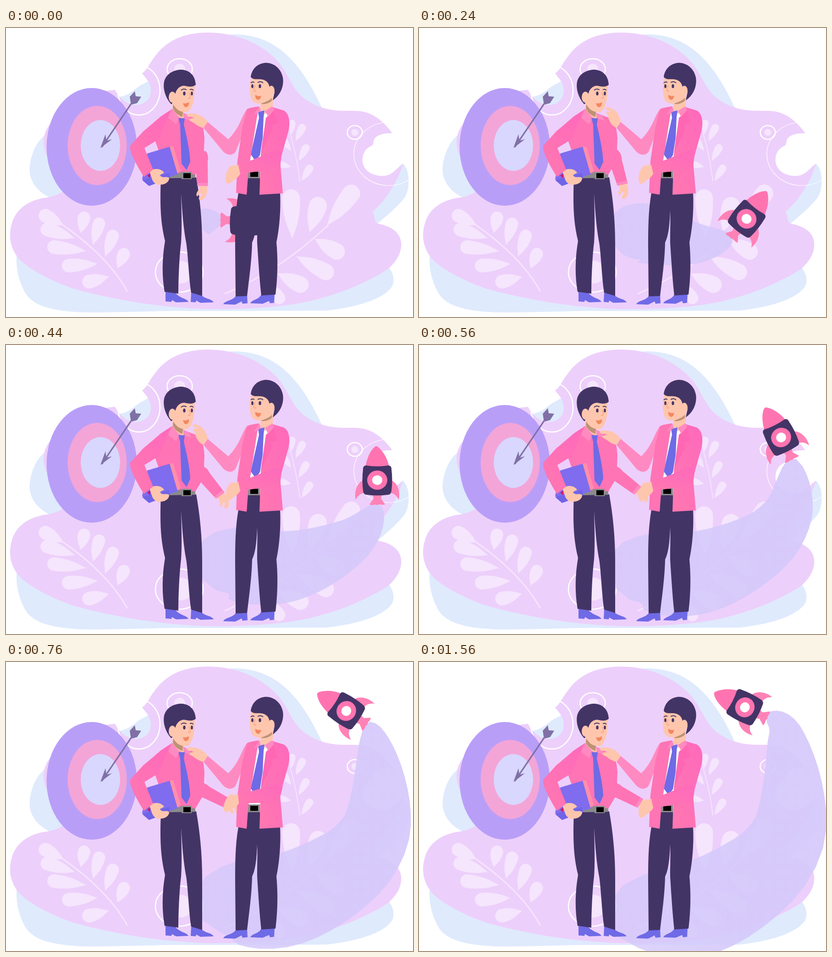
These frames come from a looping animation (888 by 631 pixels, 1600 ms). An HTML page:

```html
<!DOCTYPE html>
<html lang="en">
<head>
<meta charset="utf-8">
<title>Handshake</title>
<style>
html, body { margin: 0; width: 100%; height: 100%; overflow: hidden; background: #fff; }
svg { display: block; width: 100vw; height: 100vh; }
.lilac { fill: #edcffb; }
.pale { fill: #f5e5fd; }
.ring { fill: none; stroke: #fff; stroke-width: 2.6; }
.dark { fill: #433466; }
.pink { fill: #ff74b4; }
.light { fill: #ff8ac1; }
.deep { fill: #ff66b4; }
.skin { fill: #ffc6ae; }
.shade { fill: #bd9273; }
.blue { fill: #6f6ae6; }
.stem { fill: none; stroke: #f5e5fd; stroke-width: 3; stroke-linecap: round; }
.grey { fill: #8b8b8b; }
</style>
</head>
<body>
<svg viewBox="0 0 888 631" preserveAspectRatio="none">
  <defs>
    <linearGradient id="cloth" x1="0" y1="1" x2="1" y2="0">
      <stop offset="0" stop-color="#ff78b0"/><stop offset="1" stop-color="#ff69bc"/>
    </linearGradient>
    <linearGradient id="haze" gradientUnits="userSpaceOnUse" x1="430" y1="0" x2="760" y2="0">
      <stop offset="0" stop-color="#d2c8fa" stop-opacity=".75"/><stop offset="1" stop-color="#d6cafb" stop-opacity=".95"/>
    </linearGradient>
    <g id="face">
      <ellipse class="dark" cx="389" cy="143" rx="2.7" ry="4.3"/>
      <ellipse class="dark" cx="405.500" cy="143" rx="2.3" ry="4.3"/>
      <path fill="none" stroke="#433466" stroke-width="1.8" d="M382 136Q387 131 394 135M401 135Q405 132 409 136"/>
      <path fill="none" stroke="#f39a78" stroke-width="1.3" d="M399 141Q404 151 401 154L397 153"/>
      <path fill="#f4875f" d="M386 164Q393 166 399 162C400 169 396 173 392 173Q388 172 386 164Z"/>
    </g>
  </defs>

  <path fill="#dfeafd" d="M490 14C565 12 630 45 688 172L700 300L760 350L845 323L866 296C882 310 882 350 870 370C850 395 830 410 805 432L820 510C845 525 850 550 842 565C820 595 760 610 700 617L400 618C330 617 250 622 170 621C90 618 55 603 40 575C25 545 22 520 23 498L100 470L95 370C65 355 48 330 52 300C56 270 68 245 90 230L150 180L250 150C275 145 285 127 300 122Z"/>
  <path class="lilac" d="M297 99C308 92 312 78 325 62C345 35 375 12 435 10C500 8 560 35 595 75C620 105 625 140 660 160C700 185 735 180 765 181C800 182 825 205 843 230C825 229 812 233 805 240C800 248 803 253 798 257C785 262 776 275 778 292C781 312 798 322 820 323C842 324 850 308 866 296C857 330 838 358 825 375C815 388 805 395 800 402C808 415 800 425 815 428C850 435 865 455 862 478C860 500 845 515 835 525C790 555 730 580 660 597C600 610 520 615 440 614C330 610 230 592 150 570C90 550 40 520 25 500C10 480 5 455 12 430C20 395 50 375 90 370C120 365 130 352 150 340C110 320 80 280 82 245C85 220 95 210 110 195C150 150 200 138 238 135C245 150 262 168 285 168C305 167 317 152 316 135C315 118 305 110 297 99Z"/>

  <ellipse class="ring" cx="290" cy="136" rx="46" ry="54"/>
  <ellipse class="ring" cx="379" cy="90" rx="27.500" ry="23"/>
  <circle class="pale" cx="379" cy="90" r="12"/>
  <ellipse class="ring" cx="378" cy="533" rx="52" ry="44"/>
  <ellipse class="pale" cx="380" cy="533" rx="27" ry="25"/>
  <ellipse class="ring" cx="761" cy="228" rx="16.500" ry="15"/>
  <circle class="pale" cx="761" cy="228" r="7.5"/>
  <ellipse class="ring" cx="835" cy="275" rx="76" ry="69" style="stroke-width:1.2"/>

  <path class="stem" d="M264 574C240 530 195 480 124 430"/>
  <path class="stem" d="M478 580C570 540 640 490 702 431"/>
  <path class="stem" d="M641 334C637 300 630 265 620 230" style="stroke-width:2"/>
  <g id="leaves" class="pale"></g>

  <ellipse fill="#b99ef8" cx="187" cy="259.500" rx="98.500" ry="128.500"/>
  <ellipse fill="#f3a5d8" cx="199" cy="256.500" rx="64.500" ry="86.500"/>
  <ellipse fill="#d9d7fd" cx="206" cy="256.500" rx="43" ry="55.500"/>
  <g fill="#8070a6">
    <path d="M209 260L274 164" stroke="#8070a6" stroke-width="3.2"/>
    <path d="M206 262L217 232L219 246L231 243Z"/>
    <path d="M272 163L270 150L281 138L283 149L295 150L286 164L275 167Z"/>
  </g>

  <path id="smoke" fill="url(#haze)"/>
  <g id="rocket">
    <g fill="#ff82b6">
      <path d="M-30 0C-44 6 -51 24 -47 43C-42 33 -36 29 -28 28Z"/>
      <path d="M30 0C44 6 51 24 47 43C42 33 36 29 28 28Z"/>
      <path d="M-10 31L10 31L8 40L17 53C9 56 5 51 0 55C-5 51 -9 57 -17 53L-8 40Z"/>
    </g>
    <path fill="#ff74b0" d="M-26 -29C-22 -48 -16 -64 -5 -73Q-2 -75 1 -73C13 -63 22 -48 26 -29Z"/>
    <path class="dark" d="M-24 -32Q0 -28 24 -32Q31 -32 31 -24Q34 0 31 23Q30 32 23 32Q0 35 -23 32Q-30 32 -31 23Q-34 0 -31 -24Q-31 -32 -24 -32Z"/>
    <ellipse fill="#ff74b0" rx="22" ry="21"/>
    <ellipse fill="#fff" rx="11" ry="10.500"/>
  </g>

  <!-- man with the folder -->
  <path class="blue" d="M348 576L369 578C380 591 394 590 398 598L371 599L362 594L361 598L348 597ZM404 578L427 584C435 592 449 591 453 599L424 600L415 595L414 599L403 598Z"/>
  <path class="dark" d="M338 326L415 326C423 370 428 420 428 470L428 585L404 578C399 550 397 490 393 468C386 430 384 390 382 362C383 400 384 440 382 468C378 500 376 550 376 580L346 576C338 530 343 490 347 465C336 420 336 380 338 326Z"/>
  <path class="pink" d="M362 177L335 195L325 245L352 322L412 322L431 290L433 240C431 215 427 201 414 196L386 185Z"/>
  <path class="skin" d="M363 150L363 172C366 188 376 196 388 198L386 178Z"/>
  <path class="shade" d="M365 167C371 177 378 182 386 183L385 194C375 191 367 184 364 175Z"/>
  <path class="skin" d="M362 122L411 118C413 145 410 172 397 183C383 187 367 174 362 156Z"/>
  <path class="dark" d="M360 166C347 151 342 132 345 117C350 98 368 91 383 91C401 92 413 104 414 124C405 131 396 127 388 126C378 127 372 133 369 145L362 166Z"/>
  <ellipse class="skin" cx="363" cy="151" rx="8" ry="12"/>
  <use href="#face"/>
  <path class="light" d="M362 177L379 196L371 210L354 196ZM386 185L399 191L405 203L390 198Z"/>
  <path class="blue" d="M376 197L390 197L388 211C396 245 401 270 402 292L394 310L383 296L380 211Z"/>
  <path class="grey" d="M355 325L381 315L413 320L413 327L357 328Z"/>
  <path class="grey" d="M383 314H405V330H383Z"/>
  <path d="M387 317H403V328H387Z"/>
  <path fill="#7f6cee" d="M308 274L358 259L376 319L312 340L297 330Z"/>
  <path fill="#ff8fab" d="M357 259L365 258L381 312L374 318Z"/>
  <path fill="#6f64e6" d="M297 332L355 317L358 328L312 345Z"/>
  <path fill="#d0156a" d="M308 322L315 318L314 328Z"/>
  <path class="skin" d="M313 313C325 304 340 308 345 316L336 321C340 330 352 322 356 328C356 336 347 342 337 342C327 344 320 336 318 328Z"/>
  <path fill="url(#cloth)" d="M358 181C335 192 320 210 300 225L271 257C268 268 285 300 301 325L321 309L302 262L333 243Z"/>
  <g id="reach">
    <path class="skin" d="M64 -8C74 -12 85 -10 93 -2C99 5 97 10 92 10L84 2L81 5L88 13C84 17 77 12 72 7L64 8Z"/>
    <path class="pink" d="M-9 -13Q2 -19 14 -15L67 -12L65 11L2 13Q-14 6 -9 -13Z"/>
    <path class="light" d="M60 -12L67 -12L65 11L59 11Z"/>
  </g>

  <!-- man in the jacket -->
  <path class="blue" d="M502 584L526 582L527 601L516 602L514 597L500 604L474 603C479 594 495 596 502 584ZM557 582L586 580L585 600L576 601L574 596L560 602L533 601C538 592 551 594 557 582Z"/>
  <path class="dark" d="M527 326L554 326L556 358L598 360C600 400 596 440 590 468C594 510 592 550 588 582L557 584C553 550 550 500 548 468C548 440 549 420 548 398C547 430 544 455 537 468C536 510 530 550 526 585L501 586L500 480C500 440 500 400 507 360L525 362Z"/>
  <path fill="#fff" d="M545 188L577 182L556 290L553 316L529 316L536 270Z"/>
  <path class="skin" d="M555 155L555 178L565 188L582 172L583 148Z"/>
  <path class="shade" d="M557 162C567 162 576 158 580 152L580 159C574 164 566 167 558 166Z"/>
  <path class="skin" d="M536 105C530 125 531 148 537 158C545 168 560 166 570 159L581 148L582 110Z"/>
  <path class="dark" d="M582 158C600 146 607 125 604 108C600 88 584 76 567 76C548 77 536 90 534 107C540 114 548 111 556 112C566 113 573 118 575 129L586 140Z"/>
  <ellipse class="skin" cx="579" cy="137" rx="7" ry="11"/>
  <use href="#face" transform="matrix(-1 0 0 1 943 -16)"/>
  <path class="grey" d="M528 311H554V328H528Z"/>
  <path d="M533 314H550V325H533Z"/>
  <path class="blue" d="M550 183L564 180L562 195L560 240L554 278L544 290L534 276L552 196Z"/>
  <path class="light" d="M527 176C514 190 512 216 485 243L440 205L431 218L470 265C480 279 494 280 501 270L515 235Z"/>
  <path class="pink" d="M552 171C540 173 532 174 526 177L516 215L505 290L502 360L525 364L529 312L548 192Z"/>
  <path fill="url(#cloth)" d="M582 173L606 180C620 188 620 210 616 226L598 290L604 361L553 364L556 276L570 195Z"/>
  <path class="deep" d="M584 181L592 208L577 213L581 222L556 274L567 196Z"/>
  <path class="light" d="M553 171L540 190L556 182ZM565 181L581 171L585 179L572 194Z"/>
  <g id="shake">
    <path class="skin" d="M510 299L490 301C482 309 477 324 480 337C484 343 491 339 495 333C502 330 508 324 512 317Z"/>
    <path fill="url(#cloth)" d="M507 300L545 285L588 267L602 272L598 303L560 312L511 318Z"/>
  </g>
  <path id="hand" class="skin"/>
</svg>
<script>
const $ = id => document.getElementById(id);
const LOOP = 1600, STEP = 40, END = 960;
const lerp = (a, b, u) => a + (b - a) * u;
const rad = deg => deg * Math.PI / 180;

function leaf(x, y, turn, len, w) {
  const h = w / 2, a = len * .35, b = len - h;
  return `<path transform="translate(${x} ${y}) rotate(${turn})" d="M0 0C${a * .5} ${-h * .3} ${a} ${-h} ${b} ${-h}A${h} ${h} 0 0 1 ${b} ${h}C${a} ${h} ${a * .5} ${h * .3} 0 0Z"/>`;
}

// Leaves along one side of a stem; the middle ones are longer by `bulge`
function row(n, [x0, y0], [x1, y1], [turn0, turn1], len, bulge, w) {
  let out = '';
  for (let i = 0; i < n; i++) {
    const u = i / (n - 1);
    out += leaf(lerp(x0, x1, u), lerp(y0, y1, u), lerp(turn0, turn1, u),
      len + bulge * Math.sin(Math.PI * u), w);
  }
  return out;
}

$('leaves').innerHTML =
  row(5, [126, 431], [225, 543], [208, 166], 60, 26, 30) +
  row(4, [163, 448], [243, 525], [-78, -66], 48, 16, 27) +
  row(3, [625, 460], [700, 432], [-92, -53], 108, -28, 39) +
  row(3, [673, 460], [592, 536], [30, 26], 74, 18, 36) +
  row(3, [632, 247], [645, 334], [-64, -58], 41, 0, 17) +
  row(3, [622, 233], [622, 303], [-85, -168], 33, 0, 15) +
  leaf(583, 560, 66, 46, 26);

// Rocket: time, x, y, turn
const flight = [
  [0, 522, 421, 92], [160, 653, 440, 57], [320, 768, 378, 20],
  [440, 810, 295, 0], [680, 760, 128, -49], [960, 711, 99, -63]
];

function slope(i, k) {
  if (i === flight.length - 1) return 0;
  const a = flight[Math.max(i - 1, 0)], b = flight[i + 1];
  return (b[k] - a[k]) / (b[0] - a[0]);
}

// Smooth pose through the key points
function pose(t) {
  let i = 0;
  while (i < flight.length - 2 && t >= flight[i + 1][0]) i++;
  const a = flight[i], b = flight[i + 1], d = b[0] - a[0];
  const u = (t - a[0]) / d, v = 1 - u;
  return [1, 2, 3].map(k =>
    a[k] * v * v * (1 + 2 * u) + b[k] * u * u * (3 - 2 * u) +
    d * u * v * (slope(i, k) * v - slope(i + 1, k) * u));
}

function tail(t) {
  const [x, y, turn] = pose(Math.max(t, 0)), r = rad(turn);
  return [x - 53 * Math.sin(r) + .8 * Math.min(t, 0), y + 53 * Math.cos(r)];
}

// Trail of past tail positions that widens with distance and sinks with age
function plume(now) {
  const n = 32, born = -60, puffs = [];
  let dist = 0;
  for (let i = 0; i <= n; i++) {
    const t = lerp(now, born, i / n), [x, y] = tail(t);
    if (i) dist += Math.hypot(x - puffs[i - 1].x, y - puffs[i - 1].y);
    puffs.push({ x, y, dist, age: now - t });
  }
  for (const p of puffs) {
    p.u = p.dist / dist;
    p.half = Math.sqrt((81 + 25 * p.dist) * (1 - p.u ** 6));
  }
  for (const p of puffs) p.y += .17 * p.age * p.u * p.u;
  const near = [], far = [];
  puffs.forEach((p, i) => {
    const a = puffs[Math.max(i - 1, 0)], b = puffs[Math.min(i + 1, n)];
    const len = Math.hypot(b.x - a.x, b.y - a.y) || 1;
    const nx = (b.y - a.y) / len * p.half, ny = (a.x - b.x) / len * p.half;
    near.push([p.x + nx, p.y + ny]);
    far.unshift([p.x - nx, p.y - ny]);
  });
  return `M${near.concat(far).join('L')}Z`;
}

const handDown = 'M440 205C430 190 413 185 398 187C391 189 395 195 404 194L412 197C402 196 397 201 402 203C410 206 418 216 431 218Z';
const handUp = 'M440 205C438 189 428 175 410 173C404 174 408 179 417 181L420 184C411 179 405 183 410 187C413 196 417 213 431 218Z';

function draw(time) {
  const t = Math.min(time, END);
  const [x, y, turn] = pose(t);
  $('rocket').setAttribute('transform', `translate(${x} ${y}) rotate(${turn})`);
  $('smoke').setAttribute('d', plume(t));

  const ease = (1 - Math.cos(Math.PI * Math.min(t / 760, 1))) / 2;
  $('reach').setAttribute('transform', `translate(424 279) rotate(${lerp(86, 27, ease)})`);

  const lift = t > 560 && t < 800 ? 12.5 * Math.sin((t - 560) / 240 * Math.PI) : 0;
  $('shake').setAttribute('transform', `rotate(${lift} 597 287)`);

  const up = (time >= 240 && time < 520) || (time >= 800 && time < 1560);
  $('hand').setAttribute('d', up ? handUp : handDown);
}

function tick() {
  draw(Math.floor(performance.now() % LOOP / STEP) * STEP);
  requestAnimationFrame(tick);
}
tick();
</script>
</body>
</html>
```
